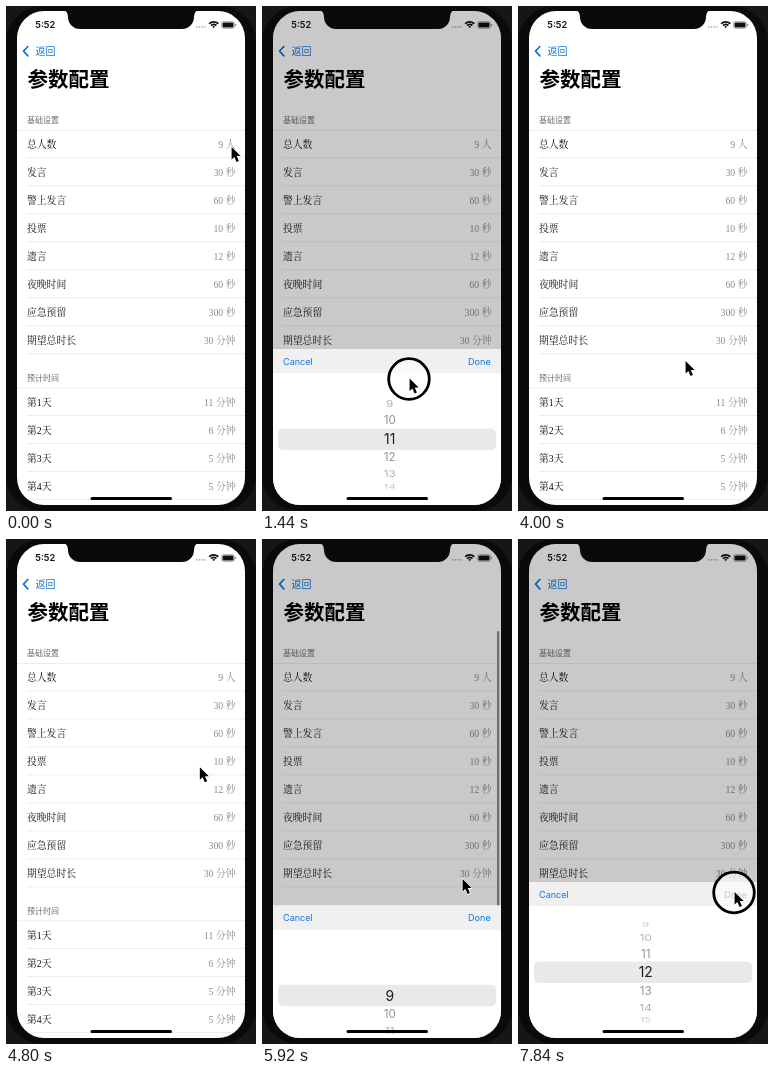
Animation, 250 px wide and 505 px high, one loop 8000 ms. Source, as an HTML page with a canvas:

```html
<!DOCTYPE html>
<html lang="zh-CN">
<head>
<meta charset="utf-8">
<title>参数配置</title>
<style>
html, body { margin: 0; width: 100%; height: 100%; overflow: hidden; background: #0a0a0a; }
canvas { display: block; width: 250px; height: 505px; }
</style>
</head>
<body>
<canvas id="stage"></canvas>
<script>
const W = 250, H = 505, LOOP = 8000, STEP = 160;
const canvas = document.getElementById('stage');
const ctx = canvas.getContext('2d');
const dpr = window.devicePixelRatio || 1;
canvas.width = W * dpr;
canvas.height = H * dpr;

const SERIF = '"Liberation Serif", "Noto Serif CJK SC", "Noto Sans CJK SC", serif';
const CJK = '"Noto Sans CJK SC", "Noto Sans CJK", sans-serif';
const UI = 'Inter, Roboto, sans-serif';
const BEZEL = '#0a0a0a', INK = '#111', LINE = '#e6e6e6', BLUE = '#0a78e6';

const SETTINGS = {
  总人数: '9 人', 发言: '30 秒', 警上发言: '60 秒', 投票: '10 秒',
  遗言: '12 秒', 夜晚时间: '60 秒', 应急预留: '300 秒', 期望总时长: '30 分钟'
};
const DAYS = Object.fromEntries([11, 6, 5, 5].map((n, i) => [`第${i + 1}天`, `${n} 分钟`]));

// What the hand does; the sheet and the wheel follow from it
const gesture = (kind, start, length, x, y, y2 = y) => ({ kind, start, end: start + length, x, y, y2 });
const tap = (start, x, y) => gesture('tap', start, 170, x, y);
const drag = (start, x, y, y2) => gesture('drag', start, 560, x, y, y2);
const pass = (start, x, y) => gesture('pass', start, 0, x, y);

const openRow = tap(160, 225, 141);
const cancel = tap(3360, 36, 355);
const reopenRow = tap(5440, 212, 137.5);
const HAND = [
  openRow, drag(1040, 147, 411, 363), drag(2320, 149, 416, 456), cancel,
  pass(4000, 167, 355), reopenRow, pass(5920, 200, 340), drag(6400, 152, 438, 384),
  tap(7680, 216, 353)
];
const FIRST = 9, ROW = 19;

const clamp = v => Math.min(1, Math.max(0, v));
const mix = (a, b, p) => a + (b - a) * p;
const smooth = p => p * p * (3 - 2 * p);
const dragY = (g, t) => mix(g.y, g.y2, smooth(clamp((t - g.start) / (g.end - g.start))));

function handAt(t) {
  const i = HAND.findLastIndex(g => g.start <= t);
  if (i < 0) return HAND[0];
  const g = HAND[i], next = HAND[i + 1];
  if (t < g.end) return { x: g.x, y: dragY(g, t), pressed: true };
  if (!next) return { x: g.x, y: g.y2 };
  const p = smooth((t - g.end) / (next.start - g.end));
  return { x: mix(g.x, next.x, p), y: mix(g.y2, next.y, p) };
}

// Share of the sheet that is up, 0 to 1
function sheetAt(t) {
  const rise = from => 1 - Math.pow(1 - clamp((t - from) / 660), 3);
  if (t >= reopenRow.end) return rise(reopenRow.end);
  if (t >= cancel.end) return Math.pow(1 - clamp((t - cancel.end) / 400), 2);
  return rise(openRow.end);
}

// The wheel follows each drag, then settles on a whole number
function wheelAt(t) {
  const opened = t < reopenRow.end ? 0 : reopenRow.end;
  let value = FIRST;
  for (const g of HAND) {
    if (g.kind !== 'drag' || g.start < opened || g.start > t) continue;
    value += (g.y - dragY(g, t)) / ROW;
    value = mix(value, Math.round(value), smooth(clamp((t - g.end) / 320)));
  }
  return value;
}

function text(str, x, y, size, family, color, align = 'left', weight = 400) {
  ctx.font = `${weight} ${size}px ${family}`;
  ctx.textAlign = align;
  ctx.fillStyle = color;
  ctx.fillText(str, x, y + size * 0.36);
}

function rect(x, y, w, h, color) {
  ctx.fillStyle = color;
  ctx.fillRect(x, y, w, h);
}

function round(x, y, w, h, r, color) {
  ctx.beginPath();
  ctx.roundRect(x, y, w, h, r);
  ctx.fillStyle = color;
  ctx.fill();
}

function stroke(width, color) {
  ctx.lineWidth = width;
  ctx.strokeStyle = color;
  ctx.stroke();
}

function clipped(x, y, w, h, r, paint) {
  ctx.save();
  ctx.beginPath();
  ctx.roundRect(x, y, w, h, r);
  ctx.clip();
  paint();
  ctx.restore();
}

function statusBar() {
  text('5:52', 29.3, 19, 9.2, UI, INK, 'left', 600);
  for (let i = 0; i < 4; i++) round(190 + i * 2.7, 20, 1.7, 1.7, 1, '#aaa');
  for (const r of [1, 3.6, 6.2]) {
    ctx.beginPath();
    ctx.arc(207.7, 22, r, -Math.PI * 0.76, -Math.PI * 0.24);
    stroke(1.8, INK);
  }
  ctx.beginPath();
  ctx.roundRect(215.5, 15.5, 13, 7, 2);
  stroke(0.7, '#999');
  round(216.5, 16.5, 11, 5, 1, INK);
  round(229.2, 17.8, 1, 2.4, 0.5, '#999');
}

function section(title, top, rows) {
  text(title, 21, top - 9.5, 8, CJK, '#6d6d72');
  rect(11, top, 228, 0.7, LINE);
  Object.entries(rows).forEach(([label, value], i) => {
    const y = top + 28 * i;
    text(label, 21, y + 14.7, 9.8, SERIF, INK);
    text(value, 229.5, y + 14.7, 9.8, SERIF, '#8c8c8e', 'right');
    rect(21, y + 27.5, 218, 0.7, LINE);
  });
}

function page(t) {
  rect(0, 0, W, H, '#fff');
  statusBar();
  ctx.beginPath();
  ctx.moveTo(22.3, 40);
  ctx.lineTo(17.5, 45.2);
  ctx.lineTo(22.3, 50.4);
  stroke(1.7, '#1273dc');
  text('返回', 29.6, 45.3, 10, CJK, '#1273dc');
  text('参数配置', 21.5, 73.8, 20.5, CJK, '#000', 'left', 700);
  section('基础设置', 124, SETTINGS);
  section('预计时间', 381.5, DAYS);
  ctx.globalAlpha = clamp((t - 5200) / 160) * clamp((6400 - t) / 240);
  round(235, 92, 2.2, 303, 1.1, '#8a8a8a');
  ctx.globalAlpha = 1;
}

function numbers(value, cy, lens) {
  for (let n = FIRST; n < FIRST + 10; n++) {
    const angle = (n - value) * 0.33;
    if (Math.abs(angle) > 1.3) continue;
    const shade = 120 + 85 * Math.abs(angle);
    ctx.save();
    ctx.translate(127.7, cy + Math.sin(angle) * 57);
    ctx.scale(1, Math.cos(angle));
    text(n, 0, 0, lens ? 13.8 : 11.7, UI, lens ? '#1a1a1a' : `rgb(${shade},${shade},${shade})`, 'center');
    ctx.restore();
  }
}

function sheet(level, value) {
  if (level <= 0) return;
  rect(0, 0, W, H, `rgba(0,0,0,${0.21 * clamp(level * 1.2)})`);
  const top = 343 + 156 * (1 - level), band = top + 79.5, bandH = 21.5;
  rect(11, top, 228, 24, '#f0f0f0');
  rect(11, top + 24, 228, 140, '#fff');
  text('Cancel', 21, top + 12.5, 9.1, UI, BLUE);
  text('Done', 228.7, top + 12.5, 9.1, UI, BLUE, 'right');
  round(16, band, 218, bandH, 5, '#e9e9e9');
  const part = (y, h, lens) => clipped(11, y, 228, h, 0, () => numbers(value, top + 90.4, lens));
  part(top + 24, band - top - 24, false);
  part(band, bandH, true);
  part(band + bandH, 39, false);
}

function notch() {
  round(62, -10, 126, 33, 12, BEZEL);
  // Flared shoulders where the notch meets the top edge
  for (const [edge, side] of [[62, -1], [188, 1]]) {
    ctx.beginPath();
    ctx.moveTo(edge, 4);
    ctx.lineTo(edge + side * 5, 4);
    ctx.quadraticCurveTo(edge, 5, edge, 11);
    ctx.fill();
  }
}

function pointer({ x, y, pressed }) {
  if (pressed) {
    ctx.beginPath();
    ctx.arc(x, y + 0.5, 20.3, 0, 7);
    ctx.fillStyle = 'rgba(255,255,255,0.65)';
    ctx.fill();
    stroke(2.8, '#000');
  }
  const arrow = new Path2D('M0 0V12.5L2.8 10L5 15L7.3 14L5.1 9.1H9Z');
  ctx.save();
  ctx.translate(x + 0.6, y);
  ctx.lineWidth = 1.6;
  ctx.strokeStyle = '#fff';
  ctx.stroke(arrow);
  ctx.fillStyle = '#000';
  ctx.fill(arrow);
  ctx.restore();
}

function draw(t) {
  ctx.setTransform(dpr, 0, 0, dpr, 0, 0);
  ctx.lineJoin = 'round';
  rect(0, 0, W, H, '#161616');
  round(0, 0, W, H, 36, BEZEL);
  clipped(11, 5, 228, 494, 27, () => {
    page(t);
    sheet(sheetAt(t), wheelAt(t));
    round(84.5, 491, 81.5, 3, 1.5, '#000');
  });
  notch();
  pointer(handAt(t));
}

const start = performance.now();
function tick() {
  const t = (performance.now() - start) % LOOP;
  draw(Math.floor(t / STEP) * STEP);
  requestAnimationFrame(tick);
}
tick();
</script>
</body>
</html>
```
